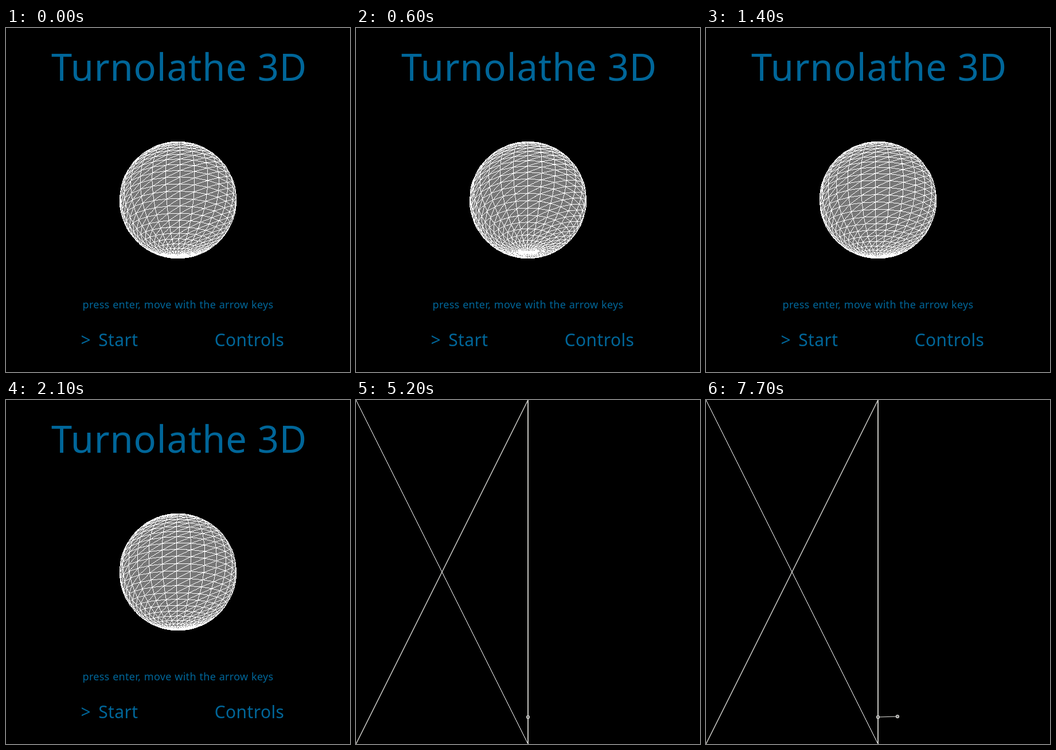
These frames come from a looping animation (600x600 px, 8 s). An HTML page with a canvas:

```html
<!DOCTYPE html>
<html lang="en">
<head>
<meta charset="utf-8">
<title>Turnolathe 3D</title>
<style>
  html, body { margin: 0; width: 100%; height: 100%; overflow: hidden; background: #000; }
  canvas, svg { position: absolute; left: 0; top: 0; width: 600px; height: 600px; }
  text { fill: #069; text-anchor: middle; font-family: "Noto Sans", "Open Sans", sans-serif; }
  .title { font-size: 65px; letter-spacing: .9px; }
  .hint { font-size: 18px; letter-spacing: .28px; word-spacing: .7px; }
  .item { font-size: 30px; letter-spacing: .4px; word-spacing: 5px; }
</style>
</head>
<body>
<canvas id="stage" width="600" height="600"></canvas>
<svg id="menu" viewBox="0 0 600 600">
  <text class="title" x="302" y="92">Turnolathe 3D</text>
  <text class="hint" x="300" y="489">press enter, move with the arrow keys</text>
  <text class="item" id="start" x="180.5" y="555">&gt; Start</text>
  <text class="item" id="controls" x="424.5" y="555">Controls</text>
</svg>
<script>
const LOOP = 8000, EDITOR = 3600;
const RADIUS = 100, DETAIL = 30, EYE = 300 / Math.tan(Math.PI / 6);
const ctx = document.getElementById('stage').getContext('2d');
const menu = document.getElementById('menu');
const start = document.getElementById('start');
const controls = document.getElementById('controls');

// time, tilt (radians), yaw (degrees)
const poses = [
  [0, .44, 1.85], [600, .62, -.3], [1100, .46, -2.8],
  [1200, .46, -2.8], [1400, .39, -2.3], [1600, .33, -1.2]
];

// x, y, dot shown, line shown, removed
const points = [
  [300, 553, 5200, 5200, LOOP],
  [334, 552, 5700, 5800, LOOP],
  [370, 553, 6200, 6300, 7700],
  [398, 555, 6700, 6800, 7500]
];

function poseAt(t) {
  const next = poses.findIndex(p => p[0] > t);
  if (next < 0) return poses[poses.length - 1].slice(1);
  const a = poses[next - 1], b = poses[next];
  const k = (t - a[0]) / (b[0] - a[0]);
  return [1, 2].map(i => a[i] + (b[i] - a[i]) * k);
}

function project(row, col, tilt, yaw) {
  const lat = Math.PI * row / DETAIL;
  const lon = 2 * Math.PI * col / DETAIL + (90 - yaw) * Math.PI / 180;
  const r = RADIUS * Math.sin(lat);
  const x = r * Math.cos(lon), y = -RADIUS * Math.cos(lat), z = r * Math.sin(lon);
  const c = Math.cos(tilt), s = Math.sin(tilt);
  const scale = EYE / (EYE - y * s - z * c);
  return [300 + x * scale, 300 + (y * c - z * s) * scale];
}

function facesEye([a, b, c]) {
  return (b[0] - a[0]) * (c[1] - a[1]) - (b[1] - a[1]) * (c[0] - a[0]) > .001;
}

// Hard one-pixel line without smoothing
function pixelLine([x1, y1], [x2, y2]) {
  const dx = x2 - x1, dy = y2 - y1;
  const steps = Math.max(1, Math.ceil(Math.max(Math.abs(dx), Math.abs(dy))));
  for (let i = 0; i <= steps; i++) {
    ctx.fillRect(Math.floor(x1 + dx * i / steps), Math.floor(y1 + dy * i / steps), 1, 1);
  }
}

function drawSphere(tilt, yaw) {
  const faces = [];
  for (let row = 0; row < DETAIL; row++) {
    for (let col = 0; col < DETAIL; col++) {
      const at = (dr, dc) => project(row + dr, col + dc, tilt, yaw);
      const a = at(0, 0), b = at(1, 0), c = at(1, 1), d = at(0, 1);
      faces.push(...[[a, b, c], [a, c, d]].filter(facesEye));
    }
  }
  ctx.beginPath();
  for (const [a, b, c] of faces) {
    ctx.moveTo(...a);
    ctx.lineTo(...b);
    ctx.lineTo(...c);
    ctx.closePath();
  }
  ctx.fillStyle = '#777';
  ctx.fill();
  ctx.fillStyle = '#fff';
  for (const [a, b, c] of faces) {
    pixelLine(a, b);
    pixelLine(b, c);
    pixelLine(c, a);
  }
}

function line(x1, y1, x2, y2, color, width) {
  ctx.strokeStyle = color;
  ctx.lineWidth = width;
  ctx.beginPath();
  ctx.moveTo(x1, y1);
  ctx.lineTo(x2, y2);
  ctx.stroke();
}

function drawEditor(t) {
  ctx.fillStyle = '#fff';
  pixelLine([0, 0], [300, 600]);
  line(300, 0, 0, 600, '#c4c4c0', 1.6);
  line(300, 0, 300, 600, '#c4c4c0', 2);
  points.forEach(([x, y, , joined, gone], i) => {
    if (i && t >= joined && t < gone) line(points[i - 1][0], points[i - 1][1], x, y, '#e4e4e0', 1.2);
  });
  for (const [x, y, shown, , gone] of points) {
    if (t < shown || t >= gone) continue;
    ctx.beginPath();
    ctx.arc(x, y, 2.5, 0, 2 * Math.PI);
    ctx.fillStyle = '#777';
    ctx.fill();
    ctx.strokeStyle = '#e4e4e0';
    ctx.lineWidth = 1.2;
    ctx.stroke();
  }
}

let drawn = -1;
function frame(now) {
  const t = Math.floor(now % LOOP / 100) * 100;
  if (t !== drawn) {
    drawn = t;
    ctx.clearRect(0, 0, 600, 600);
    const inMenu = t < EDITOR, second = t === 2000;
    menu.style.display = inMenu ? 'block' : 'none';
    start.textContent = second ? 'Start' : '> Start';
    controls.textContent = second ? '> Controls' : 'Controls';
    if (inMenu) drawSphere(...poseAt(t));
    else drawEditor(t);
  }
  requestAnimationFrame(frame);
}
frame(performance.now());
</script>
</body>
</html>
```
